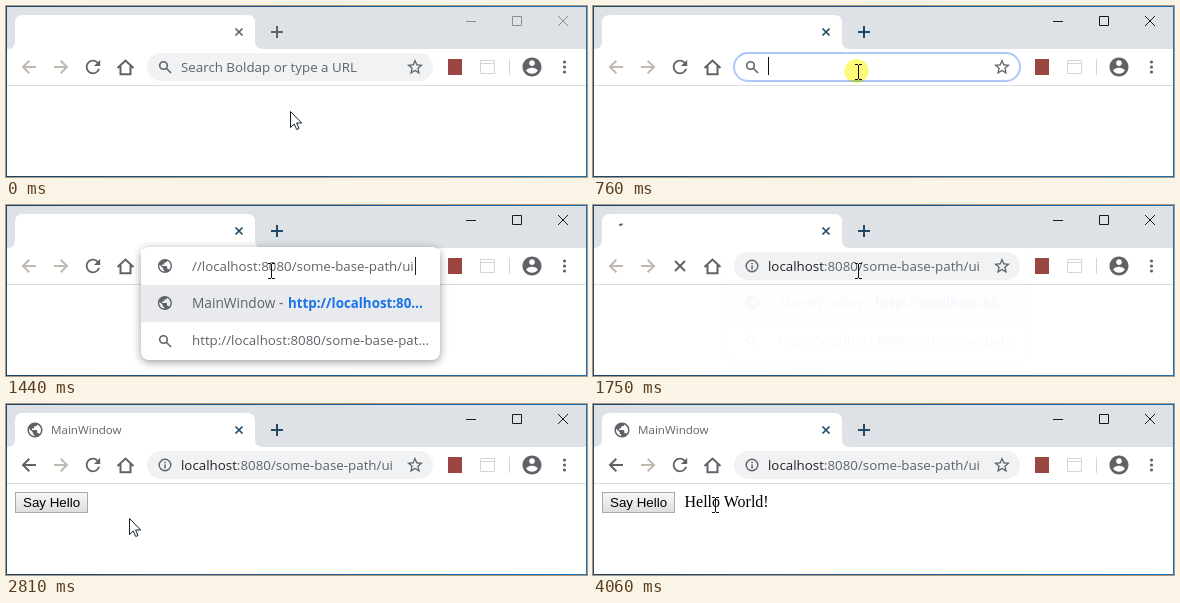
An HTML page for the animation above (4550 ms loop, 581x171 px).

```html
<!DOCTYPE html>
<html lang="en">
<head>
<meta charset="utf-8">
<title>Say Hello</title>
<style>
html, body { margin: 0; width: 100%; height: 100%; overflow: hidden; background: #fff; }
svg { display: block; width: 581px; height: 171px; }
text { font: 13.33px "Open Sans", "Noto Sans", sans-serif; fill: #5f6368; white-space: pre; }
.line { fill: none; stroke: #5f6368; stroke-width: 2; }
.fill { fill: #5f6368; }
#win { color: #8a8d91; }
#win.active { color: #1b1b1b; }
#tabs { color: #5f6368; }
#tabs.active { color: #1f4a68; }
#win path, #tabs path { fill: none; stroke: currentColor; }
#btn { fill: url(#face); stroke: #a9a9a9; }
#btn.hover { stroke: #7d7d7d; }
#btn.down { fill: #e4e4e4; }
</style>
</head>
<body>
<svg viewBox="0 0 581 171">
  <defs>
    <linearGradient id="face" x2="0" y2="1">
      <stop stop-color="#f8f8f8"/><stop offset="1" stop-color="#dddddd"/>
    </linearGradient>
    <linearGradient id="edge">
      <stop stop-color="#1d4669"/><stop offset="1" stop-color="#1a6fb0"/>
    </linearGradient>
    <path id="globe" d="M12 2C6.48 2 2 6.48 2 12s4.48 10 10 10 10-4.48 10-10S17.52 2 12 2zm-1 17.93c-3.95-.49-7-3.85-7-7.93 0-.62.08-1.21.21-1.79L9 15v1c0 1.1.9 2 2 2v1.93zm6.9-2.54c-.26-.81-1-1.39-1.9-1.39h-1v-3c0-.55-.45-1-1-1H8v-2h2c.55 0 1-.45 1-1V7h2c1.1 0 2-.9 2-2v-.41c2.93 1.19 5 4.06 5 7.41 0 2.08-.8 3.97-2.1 5.39z"/>
    <g id="lens" fill="none" stroke="#5f6368" stroke-width="1.6">
      <circle cx="157.5" cy="59.5" r="3.8"/><path d="M160.3 62.3L165 67"/>
    </g>
  </defs>

  <!-- window frame and tab strip -->
  <rect width="581" height="171" fill="#fff"/>
  <rect width="581" height="43" fill="#dee1e6"/>
  <path d="M1 43Q9 43 9 35V17Q9 9 17 9H241Q249 9 249 17V35Q249 43 257 43Z" fill="#fff"/>
  <g id="tabs">
    <path d="M229.5 22.5l7 7m0-7l-7 7" stroke-width="1.7"/>
    <path d="M265 26h12M271 20v12" stroke-width="2"/>
  </g>
  <g id="win">
    <path d="M460 15.5h10M506.5 10.5h9v9h-9zM552 10l10 10m0-10l-10 10"/>
  </g>
  <path id="spin" class="line" stroke-width="1.5"/>
  <g data-on="1985 4550">
    <use href="#globe" class="fill" transform="translate(20 17) scale(.75)"/>
    <text x="45" y="30" style="font-size:11.6px">MainWindow</text>
  </g>

  <!-- toolbar -->
  <rect y="79" width="581" height="1" fill="#dadce0"/>
  <path id="back" class="line" d="M30 61H17.5M23.3 54.8L17 61l6.3 6.2"/>
  <path class="line" style="stroke:#c1b9b0" d="M48 61h12.5M54.7 54.8L61 61l-6.3 6.2"/>
  <path class="fill" data-on="0 1750 2130 4550" transform="translate(76.2 50.2) scale(.9)" d="M17.65 6.35A7.958 7.958 0 0 0 12 4c-4.42 0-7.99 3.58-7.99 8s3.57 8 7.99 8c3.73 0 6.84-2.55 7.73-6h-2.08A5.99 5.99 0 0 1 12 18c-3.31 0-6-2.69-6-6s2.69-6 6-6c1.66 0 3.14.69 4.22 1.78L13 11h7V4l-2.35 2.35z"/>
  <path class="line" data-on="1750 2130" d="M82 56l10 10m0-10L82 66"/>
  <path class="line" d="M111.5 62l8-7.5 8 7.5M114.5 60v8.2h10V60"/>
  <rect x="442" y="53" width="14" height="16" fill="#9a4641"/>
  <path d="M474.5 54.5h14v13h-14zM474 57.5h14" fill="none" stroke="#d5d5d5"/>
  <rect x="503" y="53" width="1" height="16" fill="#d3d6da"/>
  <path class="fill" transform="translate(514.6 49.6) scale(.95)" d="M12 2C6.48 2 2 6.48 2 12s4.48 10 10 10 10-4.48 10-10S17.52 2 12 2zm0 3c1.66 0 3 1.34 3 3s-1.34 3-3 3-3-1.34-3-3 1.34-3 3-3zm0 14.2c-2.5 0-4.71-1.28-6-3.22.03-1.99 4-3.08 6-3.08 1.99 0 5.97 1.09 6 3.08-1.29 1.94-3.5 3.22-6 3.22z"/>
  <g class="fill">
    <circle cx="558.5" cy="56" r="1.6"/><circle cx="558.5" cy="61" r="1.6"/><circle cx="558.5" cy="66" r="1.6"/>
  </g>

  <!-- suggestion list -->
  <g id="popup">
    <rect x="135" y="42" width="299" height="113" rx="8" fill="#fff" style="filter:drop-shadow(0 2px 4px #0006)"/>
    <rect x="135" y="80" width="299" height="37" fill="#e8eaed"/>
    <use href="#globe" class="fill" transform="translate(150.5 89.5) scale(.7)"/>
    <text x="186" y="103" style="font-size:13.7px">MainWindow -</text>
    <text x="282" y="103" style="font-weight:700;fill:#1a73e8">http://localhost:80...</text>
    <use href="#lens" y="75"/>
    <text x="186" y="140">http://localhost:8080/some-base-pat...</text>
  </g>

  <!-- address field -->
  <g data-on="1300 1750">
    <rect x="135" y="44" width="299" height="35" fill="#fff"/>
    <use href="#globe" class="fill" transform="translate(150.6 52.6) scale(.7)"/>
    <text x="186" y="66">//localhost:8080/some-base-path/ui</text>
    <rect x="409" y="52" width="1" height="18" fill="#222"/>
  </g>
  <g data-on="0 1300 1750 4550">
    <rect data-on="0 760 1750 4550" x="141" y="47" width="286" height="28" rx="14" fill="#f0f2f3"/>
    <rect data-on="760 1300" x="141" y="47" width="286" height="28" rx="14" fill="#fff" stroke="#abc9f8" stroke-width="2"/>
    <path class="fill" transform="translate(399.4 51.4) scale(.8)" d="M22 9.24l-7.19-.62L12 2 9.19 8.63 2 9.24l5.46 4.73L5.82 21 12 17.27 18.18 21l-1.63-7.03L22 9.24zM12 15.4l-3.76 2.27 1-4.28-3.32-2.88 4.38-.38L12 6.1l1.71 4.04 4.38.38-3.32 2.88 1 4.28L12 15.4z"/>
  </g>
  <use href="#lens" data-on="0 1300"/>
  <text data-on="0 760" x="175" y="66">Search Boldap or type a URL</text>
  <rect data-on="760 1300" x="175" y="51" width="1" height="18" fill="#111"/>
  <g data-on="1750 4550">
    <circle cx="159" cy="61" r="5.8" fill="none" stroke="#5f6368" stroke-width="1.4"/>
    <path class="fill" d="M158.3 57.7h1.5v1.5h-1.5zM158.3 60.4h1.5v4h-1.5z"/>
    <text x="175" y="66"><tspan fill="#202124">localhost</tspan>:8080/some-base-path/ui</text>
  </g>

  <!-- page -->
  <g data-on="1985 4550">
    <rect id="btn" x="9.5" y="88.5" width="72" height="20"/>
    <text x="17" y="103" style="font-family:'Liberation Sans',Arial,sans-serif;fill:#000">Say Hello</text>
  </g>
  <text data-on="3360 4550" x="91.5" y="103" style="font:16px 'Liberation Serif',serif;fill:#000">Hello World!</text>

  <rect x=".5" y=".5" width="580" height="170" fill="none" stroke="url(#edge)"/>

  <!-- pointer -->
  <circle data-on="760 830" cx="263.5" cy="65" r="12" fill="#fcfa78" style="mix-blend-mode:multiply"/>
  <circle data-on="3230 3440" cx="68" cy="92" r="12" fill="#fcfa78" style="mix-blend-mode:multiply"/>
  <path id="arrow" d="M.5 .5V16.5L4.2 13 6.7 18.5 9 17.5 6.6 12H11.7Z" fill="#fff" stroke="#14202c"/>
  <path id="beam" d="M-3 -7.5H0M1 -7.5H4M.5 -7V7M-3 7.5H0M1 7.5H4" fill="none" stroke="#111"/>
</svg>
<script>
const LOOP = 4550;
const $ = id => document.getElementById(id);
const timed = [...document.querySelectorAll('[data-on]')].map(el => [el, el.dataset.on.split(' ').map(Number)]);
const show = (el, on) => el.style.display = on ? '' : 'none';
const between = (v, a, b) => v >= a && v < b;

// Pointer moves: first step, last step, number of steps, end point
const moves = [
  [120, 510, 6, 265, 66],
  [2360, 2360, 1, 187, 104],
  [2440, 2520, 2, 129, 117],
  [2750, 3040, 5, 68, 92],
  [3760, 4060, 5, 122, 101]
];

function pointerAt(t) {
  let x = 284, y = 105;
  for (const [from, to, n, ex, ey] of moves) {
    if (t < from) break;
    const gap = (to - from) / (n - 1) || 1;
    const p = Math.min(1, (Math.floor((t - from) / gap + 1e-6) + 1) / n);
    const e = p * p * (3 - 2 * p);
    x += (ex - x) * e;
    y += (ey - y) * e;
  }
  return [Math.round(x), Math.round(y)];
}

function popupOpacity(t) {
  if (between(t, 1300, 1360)) return 0.04;
  if (between(t, 1360, 1440)) return 0.17;
  if (between(t, 1440, 1750)) return 1;
  return between(t, 1750, 1840) ? 0.04 : 0;
}

function spinner(t) {
  if (!between(t, 1750, 1985)) return '';
  const step = t < 1840 ? 0 : t < 1910 ? 1 : 2;
  const point = a => `${29 + 6.5 * Math.sin(a)} ${26 - 6.5 * Math.cos(a)}`;
  return `M${point(0.1)}A6.5 6.5 0 0 0 ${point(-0.45 - step * 0.8)}`;
}

function draw(t) {
  for (const [el, spans] of timed) {
    show(el, spans.some((from, i) => i % 2 === 0 && between(t, from, spans[i + 1])));
  }
  $('win').classList.toggle('active', t >= 760);
  $('tabs').classList.toggle('active', t >= 760);
  $('back').style.stroke = t < 1985 ? '#c1b9b0' : '#5f6368';
  $('popup').style.opacity = popupOpacity(t);
  $('spin').setAttribute('d', spinner(t));

  const [x, y] = pointerAt(t);
  const inField = between(x, 141, 427) && between(y, 47, 75);
  const onText = t >= 3360 && between(x, 92, 176) && between(y, 90, 108);
  show($('beam'), inField || onText);
  show($('arrow'), !inField && !onText);
  for (const id of ['beam', 'arrow']) $(id).setAttribute('transform', `translate(${x} ${y})`);
  $('btn').classList.toggle('hover', between(x, 9, 82) && between(y, 88, 109));
  $('btn').classList.toggle('down', between(t, 3230, 3360));
}

function tick() {
  draw(performance.now() % LOOP);
  requestAnimationFrame(tick);
}
tick();
</script>
</body>
</html>
```
